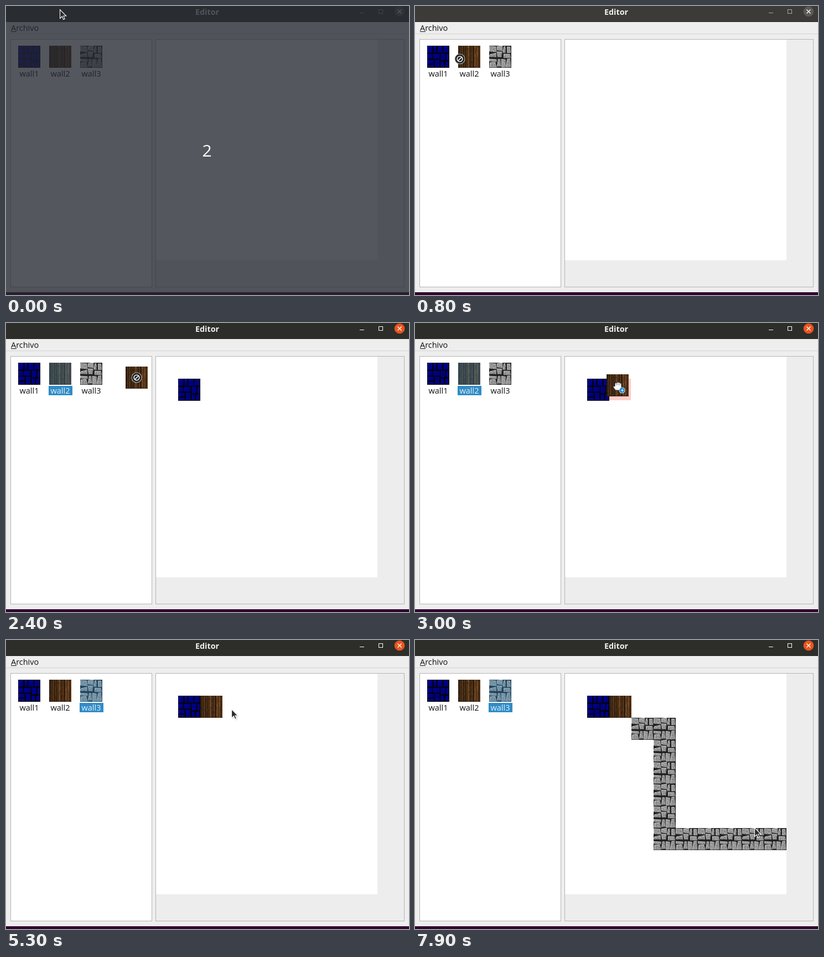
An HTML page with a canvas for the animation above (8000 ms loop, 728 by 524 pixels).

```html
<!DOCTYPE html>
<html lang="es">
<head>
<meta charset="utf-8">
<title>Editor</title>
<style>
html, body { margin: 0; width: 100%; height: 100%; overflow: hidden; background: #eee; }
canvas { display: block; }
</style>
</head>
<body>
<canvas id="stage" width="728" height="524"></canvas>
<script>
const ctx = document.getElementById('stage').getContext('2d');
const LOOP = 8000, STEP = 100, CELL = 40, GRID_X = 271, GRID_Y = 61;
const FONT = '"Open Sans", "Noto Sans", sans-serif';

// Pointer stops: arrival time and place; the pointer rests one step at each
const stops = [
  [200, 97, 6], [500, 38, 98], [600, 38, 98], [800, 81, 96], [1200, 328, 120],
  [1400, 167, 75], [1700, 25, 73], [2000, 121, 87], [2700, 351, 110],
  [3000, 366, 113], [3500, 49, 85], [3800, 38, 78], [4000, 112, 108],
  [4400, 148, 81], [4700, 148, 81], [5000, 397, 126], [5200, 407, 125],
  [5600, 428, 135], [6400, 440, 296], [6600, 447, 320], [7600, 639, 349],
  [7900, 613, 340]
];
const drags = [{ from: 800, to: 1400, wall: 0 }, { from: 2200, to: 3200, wall: 1 }];
const PAINT_START = 5400;

function pointerAt(t) {
  const i = stops.findIndex(([arrive]) => t < arrive);
  if (i < 1) return stops.at(i).slice(1);
  const [left, x0, y0] = stops[i - 1], [arrive, x1, y1] = stops[i];
  const depart = Math.min(left + STEP, arrive - STEP);
  const k = Math.max(0, (t - depart) / (arrive - depart));
  return [x0 + (x1 - x0) * k, y0 + (y1 - y0) * k].map(Math.round);
}

const snap = (v, origin) => origin + Math.floor((v - origin) / CELL) * CELL;
const cellAt = (x, y) => [snap(x, GRID_X), snap(y, GRID_Y)];

function randomFrom(seed) {
  return () => (seed = seed * 16807 % 2147483647) / 2147483647;
}

function makeTile(seed, paint) {
  const tile = document.createElement('canvas');
  tile.width = tile.height = CELL;
  paint(tile.getContext('2d'), randomFrom(seed));
  return tile;
}

// Splits the tile into uneven blocks, each with a lit and a shaded edge
function masonry(seed, rough, { seam, shade, light, face }) {
  return makeTile(seed, (g, random) => {
    const jitter = () => (random() - .5) * rough;

    function block(x, y, w, h) {
      const corners = [[x, y], [x + w, y], [x + w, y + h], [x, y + h]]
        .map(([cx, cy]) => [cx + jitter(), cy + jitter()]);
      const layer = (color, near, far) => {
        g.fillStyle = color;
        g.beginPath();
        corners.forEach(([cx, cy], i) =>
          g.lineTo(cx + (i % 3 ? -far : near), cy + (i < 2 ? near : -far)));
        g.fill();
      };
      layer(shade, 1, 1);
      layer(light, 1, 2);
      layer(face, 2, 2);
      for (let n = w * h / 4; n > 0; n--) {
        g.fillStyle = random() < .5 ? shade : light;
        g.globalAlpha = .5;
        g.fillRect(x + 2 + Math.floor(random() * (w - 4)), y + 2 + Math.floor(random() * (h - 4)), 1, 1);
      }
      g.globalAlpha = 1;
    }

    function split(x, y, w, h) {
      if (w * h < 190) return block(x, y, w, h);
      const cut = .36 + random() * .28;
      if (w * (.7 + random() * .6) > h) {
        const a = Math.round(w * cut);
        split(x, y, a, h);
        split(x + a, y, w - a, h);
      } else {
        const a = Math.round(h * cut);
        split(x, y, w, a);
        split(x, y + a, w, h - a);
      }
    }

    g.fillStyle = seam;
    g.fillRect(0, 0, CELL, CELL);
    split(0, 0, CELL, CELL);
  });
}

function planks(seed) {
  return makeTile(seed, (g, random) => {
    for (let x = 0; x < CELL; x++) {
      const tone = random() < .2 ? .5 : .75 + random() * .5;
      for (let y = 0; y < CELL; y += 4) {
        const k = tone * (.85 + random() * .3);
        g.fillStyle = `rgb(${96 * k},${60 * k},${29 * k})`;
        g.fillRect(x, y, 1, 4);
      }
    }
    g.fillStyle = 'rgba(20,10,0,.5)';
    g.fillRect(0, CELL - 1, CELL, 1);
  });
}

const blue = masonry(11, 1, { seam: '#02020a', shade: '#000040', light: '#0000b0', face: '#000080' });
const wood = planks(29);
const stone = masonry(5, 3, { seam: '#202020', shade: '#505050', light: '#c4c4c4', face: '#979797' });
const walls = [blue, wood, stone];

function rect(color, x, y, w, h) {
  ctx.fillStyle = color;
  ctx.fillRect(x, y, w, h);
}

function text(str, x, y, color, font = '14.5px', align = 'center') {
  ctx.font = `${font} ${FONT}`;
  ctx.textAlign = align;
  ctx.fillStyle = color;
  ctx.fillText(str, x, y);
}

function disc(x, y, r, color) {
  ctx.fillStyle = color;
  ctx.beginPath();
  ctx.arc(x, y, r, 0, 7);
  ctx.fill();
}

function stroke(path, color, width) {
  ctx.strokeStyle = color;
  ctx.lineWidth = width;
  ctx.stroke(path);
}

const arrowPath = new Path2D('M.5 .5V16.5L4.3 13L6.8 18.5L9.3 17.4L6.9 12H11.8Z');
const handPath = new Path2D('M4 15L0 9Q0 6 3 8V3Q4 0 6 2Q7-1 9 1Q11-1 12 2Q15 1 15 5V10L13 15Z');
const knucklePath = new Path2D('M6 2V6M9 1.5V6M12 2.5V6');
const closePath = new Path2D('M707.5 6.5L714.5 13.5M714.5 6.5L707.5 13.5');

function drawArrow(x, y) {
  ctx.save();
  ctx.translate(x, y);
  ctx.shadowColor = 'rgba(0,0,0,.35)';
  ctx.shadowBlur = 3;
  ctx.shadowOffsetX = ctx.shadowOffsetY = 1;
  ctx.fillStyle = '#2b2b2b';
  ctx.fill(arrowPath);
  ctx.shadowColor = 'transparent';
  stroke(arrowPath, '#fff', 1.1);
  ctx.restore();
}

function drawForbidden(x, y) {
  disc(x, y, 9.5, '#bbb');
  disc(x, y, 8.5, '#222');
  const sign = new Path2D();
  sign.arc(x, y, 4.8, 0, 7);
  sign.moveTo(x - 3.2, y + 3.2);
  sign.lineTo(x + 3.2, y - 3.2);
  stroke(sign, '#fff', 1.6);
}

function drawHand(x, y) {
  ctx.save();
  ctx.translate(x - 8, y - 6);
  ctx.fillStyle = '#fff';
  ctx.fill(handPath);
  stroke(handPath, '#222', 1);
  stroke(knucklePath, '#555', .8);
  ctx.restore();
  disc(x + 8, y + 9, 5.5, '#d9ecfa');
  disc(x + 8, y + 9, 4.7, '#1e88d2');
  rect('#fff', x + 6, y + 8.5, 5, 1);
  rect('#fff', x + 8, y + 6.5, 1, 5);
}

function drawPanel(x, w, color) {
  rect('#b4b4b4', x, 60, w, 450);
  rect(color, x + 1, 61, w - 2, 448);
}

function drawWindow(active) {
  rect('#eee', 0, 0, 728, 524);
  rect(active ? '#2d2e29' : '#3c3b37', 0, 0, 728, 29);
  rect('#22221f', 0, 28, 728, 1);
  text('Editor', 363.5, 16, '#f2f1ee', 'bold 14.3px');
  const control = active ? '#fff' : '#a9a8a4';
  rect(control, 639, 12, 8, 1);
  ctx.strokeStyle = control;
  ctx.lineWidth = 1;
  ctx.strokeRect(673.5, 6.5, 7, 7);
  disc(711, 10, 9.3, active ? '#e95420' : '#5b5a57');
  stroke(closePath, '#fff', 1.4);

  text('Archivo', 9, 45, '#111', '14.5px', 'left');
  rect('#111', 9, 46, 10, 1);
  rect('#d3d3d3', 0, 50, 728, 1);
  drawPanel(8, 256, '#fff');
  drawPanel(270, 450, '#ededed');
  rect('#fff', GRID_X, GRID_Y, 10 * CELL, 10 * CELL);
  rect('#300030', 0, 519, 728, 5);
}

function drawPalette(selected) {
  walls.forEach((tile, i) => {
    const x = 22 + 56 * i;
    ctx.drawImage(tile, x, 72);
    if (i === selected) {
      rect('rgba(48,140,198,.32)', x, 72, CELL, CELL);
      rect('#308cc6', x - 1, 114, 43, 17);
    }
    text('wall' + (i + 1), x + 20, 128, i === selected ? '#e6f1fa' : '#111');
  });
}

function drawMap(t) {
  drags.forEach(({ to, wall }) => {
    if (t >= to) ctx.drawImage(walls[wall], ...cellAt(...pointerAt(to - STEP)));
  });
  // The brush point sits inside the arrow, below its tip
  for (let s = PAINT_START; s <= t; s += STEP) {
    const [x, y] = pointerAt(s);
    ctx.drawImage(stone, ...cellAt(x + 10, y + 22));
  }
}

function drawDrag({ from, wall }, t, x, y) {
  const overMap = x >= GRID_X;
  if (overMap) rect('#ffcdc8', ...cellAt(x, y), CELL - 1, CELL - 1);
  if (t > from) ctx.drawImage(walls[wall], x - 20, y - 20);
  (overMap ? drawHand : drawForbidden)(x, y);
}

function draw(now) {
  const t = Math.floor(now % LOOP / STEP) * STEP;
  const [x, y] = pointerAt(t);
  // Each wall stays selected until the next one is picked
  const selected = [900, 2200, 4900].filter(time => t >= time).length - 1;
  drawWindow(t >= 900);
  drawPalette(selected);
  const drag = drags.find(d => t >= d.from && t < d.to);
  drawMap(t);
  if (t < 100) {
    rect('rgba(36,40,48,.78)', 0, 0, 728, 524);
    text('2', 363, 273, '#fff', '30px');
  }
  if (drag) drawDrag(drag, t, x, y);
  else drawArrow(x, y);
}

const start = performance.now();
function frame() {
  draw(performance.now() - start);
  requestAnimationFrame(frame);
}
frame();
</script>
</body>
</html>
```
